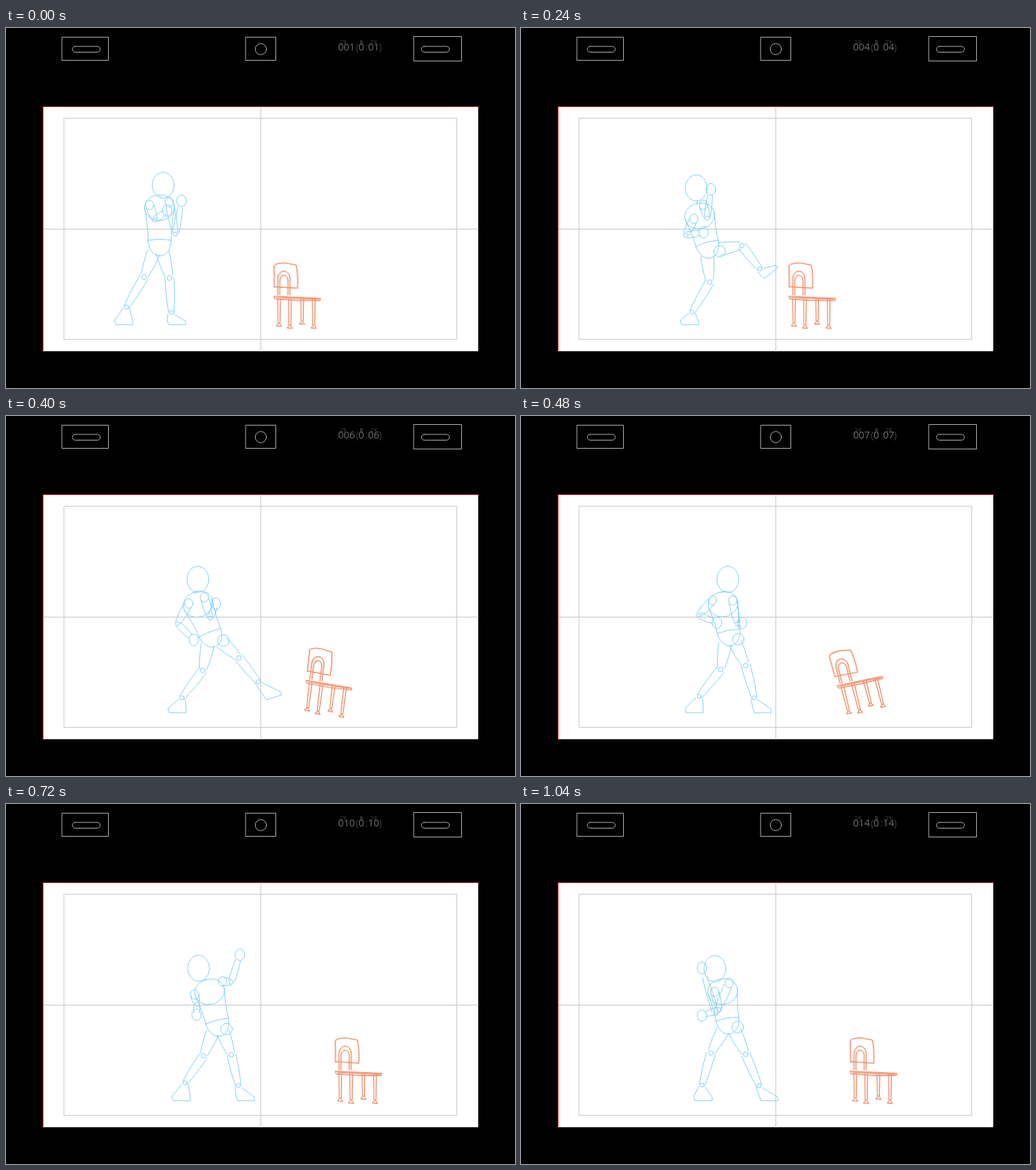
An HTML page that plays this animation: 748x529 px, repeating every 1.12 s.

```html
<!DOCTYPE html>
<html lang="en">
<head>
<meta charset="utf-8">
<title>Kick test</title>
<style>
html, body { margin: 0; width: 100%; height: 100%; overflow: hidden; background: #000; }
svg { display: block; width: 748px; height: 529px; }
path, rect, circle { fill: none; stroke-linecap: round; stroke-linejoin: round; }
.pegs { stroke: #b4b4b4; }
.guide { stroke: #c6c6c6; }
.figure { stroke: #74caf1; stroke-width: .9; }
.chair { stroke: #ee8a64; stroke-width: .95; }
text { font: 500 14.5px "Open Sans", "Noto Sans", sans-serif; fill: #707070; }
.dim { fill: #3c3c3c; }
.tiny { font: 5px "Noto Sans CJK JP", "Noto Sans CJK", sans-serif; }
</style>
</head>
<body>
<svg viewBox="0 0 748 529">
  <rect width="748" height="529" style="fill:#000"/>
  <g class="pegs">
    <rect x="82.5" y="13.5" width="68" height="34"/>
    <rect x="97.5" y="27" width="41" height="8.5" rx="4.2"/>
    <rect x="352.5" y="13.5" width="44" height="34"/>
    <circle cx="374.5" cy="31" r="8.2"/>
    <rect x="599.5" y="12.5" width="70" height="36"/>
    <rect x="610.5" y="27" width="41" height="8.5" rx="4.2"/>
  </g>
  <text class="tiny" x="490" y="22">コマ</text>
  <text class="tiny" x="520" y="22">秒</text>
  <text class="tiny" x="535" y="22">コマ</text>
  <text id="count" x="488" y="33"></text>
  <text class="dim" x="514" y="33">(</text>
  <text x="518" y="33">0</text>
  <text class="dim" x="528" y="33">:</text>
  <text id="part" x="532" y="33"></text>
  <text class="dim" x="548" y="33">)</text>

  <rect x="55" y="116" width="639" height="359" style="fill:#fff"/>
  <path d="M55 115.5H694" stroke="#c01010"/>
  <path d="M54.5 475V116" stroke="#f00"/>
  <path class="guide" d="M85.5 132.5H662.5V457.5H85.5ZM374.5 116V475M55 295.5H694"/>
  <path class="figure" id="figure"/>
  <g class="chair" id="chair">
    <path id="line"/>
    <path id="again" transform="translate(.8 .6) rotate(.5)" opacity=".7"/>
    <path id="streaks"/>
  </g>
</svg>
<script>
const STEP = 80, STEPS = 14, HIT = 4, REST = 8, GROUND = 436;
const $ = id => document.getElementById(id);

// Arms: shoulder, hand, elbow offset. Legs: ankle, knee offset.
const poses = {
  0: { head: [231, 231], hips: [226, 322], rear: [211, 260, 237, 268, -19], lead: [240, 256, 258, 254, 48], kick: [177, 410, 4], stand: [243, 418, 5] },
  2: { head: [255, 230], hips: [252, 322], rear: [252, 281, 273, 246, -31], lead: [264, 258, 266, 226, 29], kick: [304, 341, 40], stand: [248, 419, 20] },
  4: { head: [260, 240], hips: [300, 330], rear: [256, 280, 264, 354, -17], lead: [272, 262, 292, 248, 33], kick: [398, 367, 3], stand: [255, 416, 10] },
  6: { head: [304, 240], hips: [307, 326], rear: [281, 271, 288, 304, -24], lead: [311, 271, 325, 304, 18], kick: [343, 414, 4], stand: [262, 412, 12] },
  8: { head: [282, 240], hips: [311, 328], rear: [276, 277, 280, 309, -3], lead: [318, 263, 353, 245, 31], kick: [343, 414, 3], stand: [262, 409, 6] },
  11: { head: [285, 244], hips: [316, 330], rear: [280, 286, 280, 311, 12], lead: [319, 256, 325, 174, 0], kick: [338, 413, 4], stand: [265, 411, 3] },
  13: { head: [285, 242], hips: [305, 326], rear: [285, 276, 266, 311, 18], lead: [306, 263, 266, 241, 56], kick: [350, 414, 1], stand: [266, 413, -5] }
};
const keys = Object.keys(poses).map(Number);

const mix = (a, b, f) => a + (b - a) * f;
const mixAll = (a, b, f) => a.map((v, i) => mix(v, b[i], f));
const move = ([x, y], [dx, dy], d = 1) => [x + dx * d, y + dy * d];
const unit = (a, b) => {
  const len = Math.hypot(b[0] - a[0], b[1] - a[1]) || 1;
  return [(b[0] - a[0]) / len, (b[1] - a[1]) / len];
};
const side = ([x, y]) => [y, -x];
const degrees = ([x, y]) => Math.atan2(y, x) * 180 / Math.PI;
const clamp = (v, lo, hi) => Math.max(lo, Math.min(hi, v));

function poseAt(step) {
  const from = keys.filter(k => k <= step).pop(), to = keys.find(k => k >= step);
  const f = to > from ? (step - from) / (to - from) : 0;
  const pose = {};
  for (const part in poses[from]) pose[part] = mixAll(poses[from][part], poses[to][part], f);
  return pose;
}

// Path pieces
const pt = p => p.map(v => v.toFixed(1)).join(' ');
const poly = (...pts) => 'M' + pts.map(pt).join('L');
const bow = (a, c, b) => `M${pt(a)}Q${pt(c)} ${pt(b)}`;
const oval = ([x, y], rx, ry = rx, turn = 0) => {
  const a = turn * Math.PI / 180, r = [Math.cos(a) * rx, Math.sin(a) * rx];
  const arc = `A${rx} ${ry} ${turn} 0 1 `;
  return `M${pt(move([x, y], r))}${arc}${pt(move([x, y], r, -1))}${arc}${pt(move([x, y], r))}`;
};
const bowl = (left, right, rx, ry, turn) => `M${pt(right)}A${rx} ${ry} ${turn} 0 1 ${pt(left)}`;

// Two tapering, slightly rounded outlines between joints.
function bone(a, b, wa, wb, start = 0, end = 1) {
  const n = side(unit(a, b)), p = mixAll(a, b, start), q = mixAll(a, b, end);
  return [-1, 1].map(s => bow(move(p, n, s * wa),
    move(mixAll(p, q, .45), n, s * (mix(wa, wb, .4) + 1.5)), move(q, n, s * wb))).join('');
}

function arm(shoulder, elbow, hand) {
  return oval(shoulder, 6, 7) + bone(shoulder, elbow, 6, 4, .1, .95) + oval(elbow, 3)
    + bone(elbow, hand, 4.5, 3.5, .05, .8) + oval(hand, 7, 8.5);
}

// A low foot stands on the ground; a raised one turns with the shin.
function foot(knee, ankle) {
  const shin = unit(knee, ankle);
  const lift = clamp((400 - ankle[1]) / 20, 0, 1);
  const down = mixAll([0, 1], shin, lift), ahead = mixAll([1, 0], side(shin), lift);
  const depth = mix(GROUND - ankle[1], 15, lift);
  const centre = mix(6 + 18 * shin[0] / Math.max(.4, shin[1]), 8, lift);
  const at = (x, y) => move(move(ankle, ahead, x), down, y);
  return poly(at(-5, 2), at(centre - 13, depth - 6), at(centre - 11, depth), at(centre + 14, depth), at(centre + 14, depth - 5), at(5, 3));
}

function leg(hip, [x, y, bend]) {
  const ankle = [x, y];
  const knee = move(mixAll(hip, ankle, .48), side(unit(hip, ankle)), bend);
  return bone(hip, knee, 9.5, 5.5, .18, .95) + oval(knee, 3.5) + bone(knee, ankle, 6.5, 4)
    + oval(ankle, 3) + foot(knee, ankle);
}

function figureAt(step) {
  const { head, hips, rear, lead, kick, stand } = poseAt(step);
  const ends = limb => [limb.slice(0, 2), limb.slice(2, 4)];
  const [rs, rh] = ends(rear), [ls, lh] = ends(lead);
  const mid = mixAll(rs, ls, .5);
  const spine = unit(mid, hips), across = side(spine), turn = degrees(across);

  const chest = move(mid, spine, 6), belt = move(hips, spine, -10);
  const [cl, cr] = [-22, 22].map(d => move(chest, across, d));
  const [bl, br] = [-17, 17].map(d => move(belt, across, d));
  const up = p => pt(move(p, spine, -25));
  const trunk = bowl(cl, cr, 22, 19, turn) + `M${pt(cl)}C${up(cl)} ${up(cr)} ${pt(cr)}`
    + [[cl, bl, 2], [cr, br, -2]].map(([a, b, d]) => bow(a, move(mixAll(a, b, .6), across, d), b)).join('')
    + bowl(bl, br, 17, 23, turn) + bow(bl, move(belt, spine, -3), br);
  const neck = poly(move(head, unit(head, mid), 18), move(mid, spine, -11));

  // Each hip shifts towards its own foot.
  const hip = ankle => move(hips, [clamp((ankle[0] - hips[0]) * .12, -8, 8), 0]);
  const joint = kick[0] > hips[0] ? oval(move(hip(kick), [8, 2]), 8.5) : '';

  const rearElbow = move(mixAll(rs, rh, .5), side(unit(rs, rh)), rear[4]);
  const leadElbow = move(mixAll(ls, lh, .5), [0, lead[4]]);
  return oval(head, 16, 19.2) + neck + trunk + joint + arm(rs, rearElbow, rh) + arm(ls, leadElbow, lh)
    + leg(hip(kick), kick) + leg(hip(stand), stand);
}

// The chair jumps at the hit, slides with ease-out and rocks to rest.
function chairAt(step) {
  if (step < HIT) return [396, 396, 0];
  const u = Math.min(1, (step - HIT) / (REST - HIT)), left = 1 - u;
  return [
    409 + 77 * (1 - left ** 2),
    396 - 25 * left ** 4 + 4 * Math.sin(Math.PI * u) - 1.5 * u,
    34 * left * Math.cos(5.18 * u)
  ];
}

// Chair drawn around its rear seat corner.
function chairLine() {
  const back = 'M-2 -15L-2.5 -47Q0 -51 14 -51L30 -48Q33 -36 32 -14L-2 -16';
  const arch = inset => `M${3 + inset} -4V${-28 + inset}A${9 - inset} ${11 - inset} 0 0 1 ${21 - inset} ${-28 + inset}V-4`;
  const seat = 'M-2 -2L66 1L65 4L32 4L-1 2ZM1 0L63 2';
  const legs = [5, 21, 39, 56].map((x, i) => {
    const foot = 37 + (i % 2) * 3 - (i === 2 ? 3 : 0);
    return `M${x - 2} 2L${x - 1.5} ${foot}M${x + 2} 2L${x + 1.5} ${foot}M${x} ${foot}l-4 4.5l7.5 .5Z`;
  });
  return back + arch(0) + arch(3) + seat + legs.join('');
}

function random(seed) {
  return () => (seed = seed * 16807 % 2147483647) / 2147483647;
}

function streakLine() {
  const rnd = random(41);
  return Array.from({ length: 20 }, (_, i) =>
    `M${(-8 + 60 * rnd()).toFixed(1)} ${(-48 + 4.2 * i).toFixed(1)}l${(8 + 14 * rnd()).toFixed(1)} -1`).join('');
}

$('line').setAttribute('d', chairLine());
$('again').setAttribute('d', chairLine());
$('streaks').setAttribute('d', streakLine());
const figures = Array.from({ length: STEPS }, (_, i) => figureAt(i));

let shown = -1;
function show(step) {
  if (step === shown) return;
  shown = step;
  const [x, y, tilt] = chairAt(step);
  $('figure').setAttribute('d', figures[step]);
  $('chair').setAttribute('transform', `translate(${x} ${y}) rotate(${tilt})`);
  $('streaks').style.display = step === HIT ? '' : 'none';
  $('count').textContent = String(step + 1).padStart(3, '0');
  $('part').textContent = String(step + 1).padStart(2, '0');
}

const start = performance.now();
function tick() {
  show(Math.floor((performance.now() - start) / STEP) % STEPS);
  requestAnimationFrame(tick);
}
tick();
</script>
</body>
</html>
```
